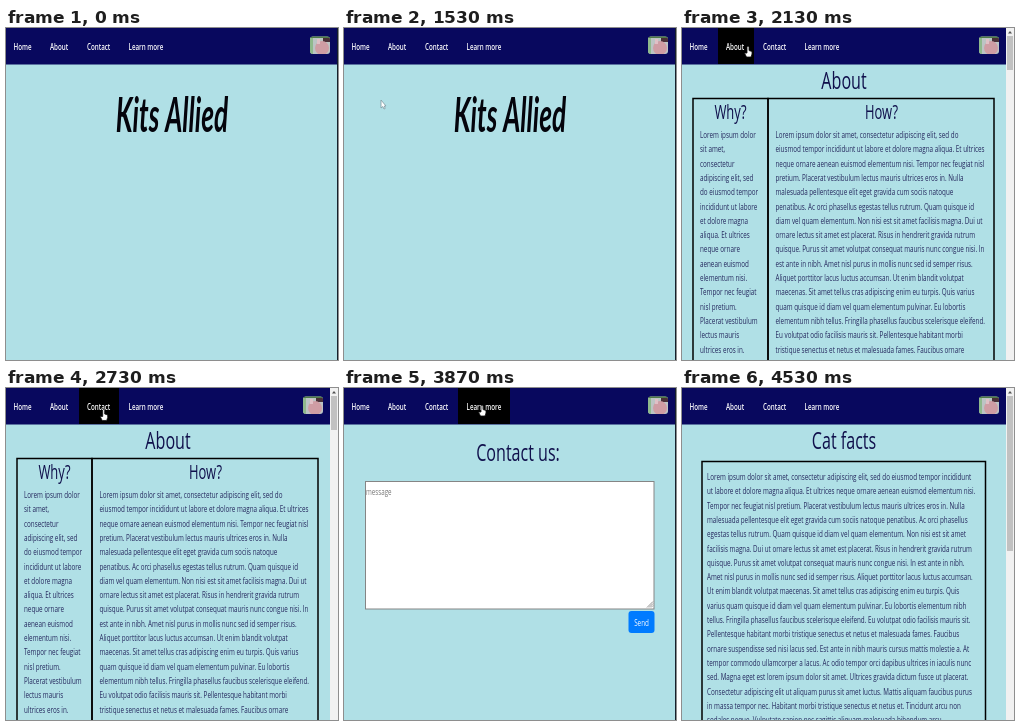
Write an HTML page with a canvas that moves like this. It is 332 px wide and 332 px high and loops after 4600 ms.

```html
<!DOCTYPE html>
<html lang="en">
<head>
<meta charset="utf-8">
<title>Website walkthrough</title>
<style>
  html, body { margin: 0; width: 100%; height: 100%; overflow: hidden; background: #b0e0e6; }
  canvas { display: block; }
</style>
</head>
<body>
<canvas id="stage" width="332" height="332"></canvas>
<script>
const ctx = document.getElementById('stage').getContext('2d');
const SIZE = 332, LOOP = 4600, STEP = 1000 / 15;
const NAVY = '#08085e', INK = '#10104c', PAGE = '#b0e0e6';
const SANS = '"Open Sans", "Noto Sans", sans-serif';
const SQUEEZE = 0.67;

const TABS = [
  { label: 'Home', x: 0, w: 35, textX: 7.5 },
  { label: 'About', x: 36, w: 36, textX: 44 },
  { label: 'Contact', x: 73, w: 40, textX: 81 },
  { label: 'Learn more', x: 114, w: 52, textX: 122.5 },
];

// Cursor stops: time, x, y
const PATH = [
  [0, 215, 336], [530, 54, 99], [930, 15, 12], [1130, 15, 12],
  [1530, 37, 72], [1600, 39, 75], [1930, 66, 18], [2130, 66, 18],
  [2330, 78, 58], [2530, 96, 24], [2800, 98, 21], [3130, 98, 21],
  [3470, 116, 66], [3730, 136, 20], [3870, 138, 17], [4070, 138, 17],
  [4480, 215, 336], [4600, 215, 336],
];

const WHY = `Lorem ipsum dolor
sit amet,
consectetur
adipiscing elit, sed
do eiusmod tempor
incididunt ut labore
et dolore magna
aliqua. Et ultrices
neque ornare
aenean euismod
elementum nisi.
Tempor nec feugiat
nisl pretium.
Placerat vestibulum
lectus mauris
ultrices eros in.`.split('\n');

const HOW = `Lorem ipsum dolor sit amet, consectetur adipiscing elit, sed do
eiusmod tempor incididunt ut labore et dolore magna aliqua. Et ultrices
neque ornare aenean euismod elementum nisi. Tempor nec feugiat nisl
pretium. Placerat vestibulum lectus mauris ultrices eros in. Nulla
malesuada pellentesque elit eget gravida cum sociis natoque
penatibus. Ac orci phasellus egestas tellus rutrum. Quam quisque id
diam vel quam elementum. Non nisi est sit amet facilisis magna. Dui ut
ornare lectus sit amet est placerat. Risus in hendrerit gravida rutrum
quisque. Purus sit amet volutpat consequat mauris nunc congue nisi. In
est ante in nibh. Amet nisl purus in mollis nunc sed id semper risus.
Aliquet porttitor lacus luctus accumsan. Ut enim blandit volutpat
maecenas. Sit amet tellus cras adipiscing enim eu turpis. Quis varius
quam quisque id diam vel quam elementum pulvinar. Eu lobortis
elementum nibh tellus. Fringilla phasellus faucibus scelerisque eleifend.
Eu volutpat odio facilisis mauris sit. Pellentesque habitant morbi
tristique senectus et netus et malesuada fames. Faucibus ornare`.split('\n');

const FACTS = `Lorem ipsum dolor sit amet, consectetur adipiscing elit, sed do eiusmod tempor incididunt
ut labore et dolore magna aliqua. Et ultrices neque ornare aenean euismod elementum nisi.
Tempor nec feugiat nisl pretium. Placerat vestibulum lectus mauris ultrices eros in. Nulla
malesuada pellentesque elit eget gravida cum sociis natoque penatibus. Ac orci phasellus
egestas tellus rutrum. Quam quisque id diam vel quam elementum. Non nisi est sit amet
facilisis magna. Dui ut ornare lectus sit amet est placerat. Risus in hendrerit gravida rutrum
quisque. Purus sit amet volutpat consequat mauris nunc congue nisi. In est ante in nibh.
Amet nisl purus in mollis nunc sed id semper risus. Aliquet porttitor lacus luctus accumsan.
Ut enim blandit volutpat maecenas. Sit amet tellus cras adipiscing enim eu turpis. Quis
varius quam quisque id diam vel quam elementum pulvinar. Eu lobortis elementum nibh
tellus. Fringilla phasellus faucibus scelerisque eleifend. Eu volutpat odio facilisis mauris sit.
Pellentesque habitant morbi tristique senectus et netus et malesuada fames. Faucibus
ornare suspendisse sed nisi lacus sed. Est ante in nibh mauris cursus mattis molestie a. At
tempor commodo ullamcorper a lacus. Ac odio tempor orci dapibus ultrices in iaculis nunc
sed. Magna eget est lorem ipsum dolor sit amet. Ultrices gravida dictum fusce ut placerat.
Consectetur adipiscing elit ut aliquam purus sit amet luctus. Mattis aliquam faucibus purus
in massa tempor nec. Habitant morbi tristique senectus et netus et. Tincidunt arcu non
sodales neque. Vulputate sapien nec sagittis aliquam malesuada bibendum arcu`.split('\n');

function rect(x, y, w, h, color) {
  ctx.fillStyle = color;
  ctx.fillRect(x, y, w, h);
}

function roundRect(x, y, w, h, r, color) {
  ctx.fillStyle = color;
  ctx.beginPath();
  ctx.roundRect(x, y, w, h, r);
  ctx.fill();
}

function text(str, x, y, size, { color = INK, align = 'left', style = '', family = SANS, squeeze = SQUEEZE } = {}) {
  ctx.save();
  ctx.translate(x, y);
  ctx.scale(squeeze, 1);
  ctx.font = `${style} ${size}px ${family}`;
  ctx.textAlign = align;
  ctx.fillStyle = color;
  ctx.fillText(str, 0, 0);
  ctx.restore();
}

function heading(str, x, y, size) {
  text(str, x, y, size, { align: 'center' });
}

function paragraph(lines, x, y) {
  lines.forEach((line, i) => text(line, x, y + i * 14.3, 9.4, { color: '#25285e' }));
}

function frame(x, y, w, h) {
  ctx.strokeStyle = '#000';
  ctx.lineWidth = 1.5;
  ctx.strokeRect(x, y, w, h);
}

function scrollbar(thumbEnd) {
  rect(324, 0, 8, SIZE, '#f1f1f1');
  rect(325, 8, 6, thumbEnd - 8, '#c1c1c1');
  ctx.fillStyle = '#505050';
  ctx.beginPath();
  ctx.moveTo(326, 5.5);
  ctx.lineTo(328, 3);
  ctx.lineTo(330, 5.5);
  ctx.fill();
}

function photo(x) {
  ctx.save();
  ctx.beginPath();
  ctx.roundRect(x, 8.5, 20, 17.5, 3);
  ctx.clip();
  rect(x, 8, 20, 18, '#bcc4c4');
  rect(x, 8, 20, 2, '#4f7a48');
  rect(x, 10, 3, 16, '#8fb98c');
  rect(x + 13, 10, 7, 4, '#4a3038');
  ctx.fillStyle = '#cf9da4';
  ctx.beginPath();
  ctx.ellipse(x + 12, 20, 7, 7, 0, 0, 7);
  ctx.fill();
  rect(x + 7, 11, 3, 5, '#e0c0c6');
  ctx.restore();
}

function navbar(hovered, scrolls) {
  rect(0, 0, SIZE, 36.5, NAVY);
  for (const tab of TABS) {
    if (tab === hovered) rect(tab.x, 0, tab.w, 36, '#000');
    text(tab.label, tab.textX, 22, 9.3, { color: '#fff', style: '600' });
  }
  photo(scrolls ? 297 : 304);
}

const pages = {
  home() {
    text('Kits Allied', 166, 104, 47, {
      color: '#04040c', align: 'center', style: 'italic bold',
      family: 'Lato, sans-serif', squeeze: 0.56,
    });
  },
  about() {
    heading('About', 162, 61, 24);
    frame(11, 70.5, 75, 300);
    frame(86, 70.5, 226, 300);
    heading('Why?', 48.5, 91, 19.3);
    heading('How?', 199.5, 91, 19.3);
    paragraph(WHY, 18, 110);
    paragraph(HOW, 93.5, 110);
    scrollbar(42);
  },
  contact() {
    heading('Contact us:', 174, 73, 24);
    rect(21, 93, 289.5, 128.5, '#858585');
    rect(22, 94, 287.5, 126.5, '#fff');
    text('message', 22, 107, 9.3, { color: '#777' });
    ctx.strokeStyle = '#777';
    ctx.lineWidth = 0.8;
    ctx.beginPath();
    for (const d of [2, 4, 6]) {
      ctx.moveTo(309 - d, 219.5);
      ctx.lineTo(309, 219.5 - d);
    }
    ctx.stroke();
    roundRect(284.5, 223, 26, 22, 3, '#007bff');
    text('Send', 297.5, 238, 9.4, { color: '#fff', align: 'center' });
  },
  facts() {
    heading('Cat facts', 162, 61, 24);
    frame(20, 73.5, 283.5, 300);
    paragraph(FACTS, 25, 92);
    scrollbar(163);
  },
};

function cursorAt(t) {
  const i = PATH.findIndex(stop => stop[0] > t);
  const [t0, x0, y0] = PATH[i - 1], [t1, x1, y1] = PATH[i];
  const u = (t - t0) / (t1 - t0), ease = u * u * (3 - 2 * u);
  return { x: x0 + (x1 - x0) * ease, y: y0 + (y1 - y0) * ease };
}

function drawCursor({ x, y }, isHand) {
  const shape = new Path2D(isHand
    ? 'M-1 1Q0-1 1 1V4.5L4 5.5V8L3 11H-1.5L-3.5 7L-1 7Z'
    : 'M0 0V8L1.8 6.5L3 9L4.2 8.4L3.2 6H5Z');
  ctx.save();
  ctx.translate(x, y);
  ctx.lineWidth = 0.8;
  ctx.strokeStyle = isHand ? '#111' : '#7d97a0';
  ctx.fillStyle = '#fff';
  ctx.fill(shape);
  ctx.stroke(shape);
  ctx.restore();
}

function pageAt(t) {
  if (t < 2065) return 'home';
  if (t < 2995) return 'about';
  return t < 3995 ? 'contact' : 'facts';
}

function draw(now) {
  const t = Math.floor(((now + 5) % LOOP) / STEP) * STEP;
  const page = pageAt(t), cursor = cursorAt(t);
  const scrolls = page === 'about' || page === 'facts';
  const hovered = cursor.y < 36 &&
    TABS.find(tab => cursor.x >= tab.x && cursor.x < tab.x + tab.w);
  rect(0, 0, SIZE, SIZE, PAGE);
  navbar(hovered, scrolls);
  pages[page]();
  if (!scrolls) rect(331, 0, 1, SIZE, '#16202c');
  drawCursor(cursor, hovered);
}

const start = performance.now();
function tick() {
  draw(performance.now() - start);
  requestAnimationFrame(tick);
}
tick();
</script>
</body>
</html>
```
